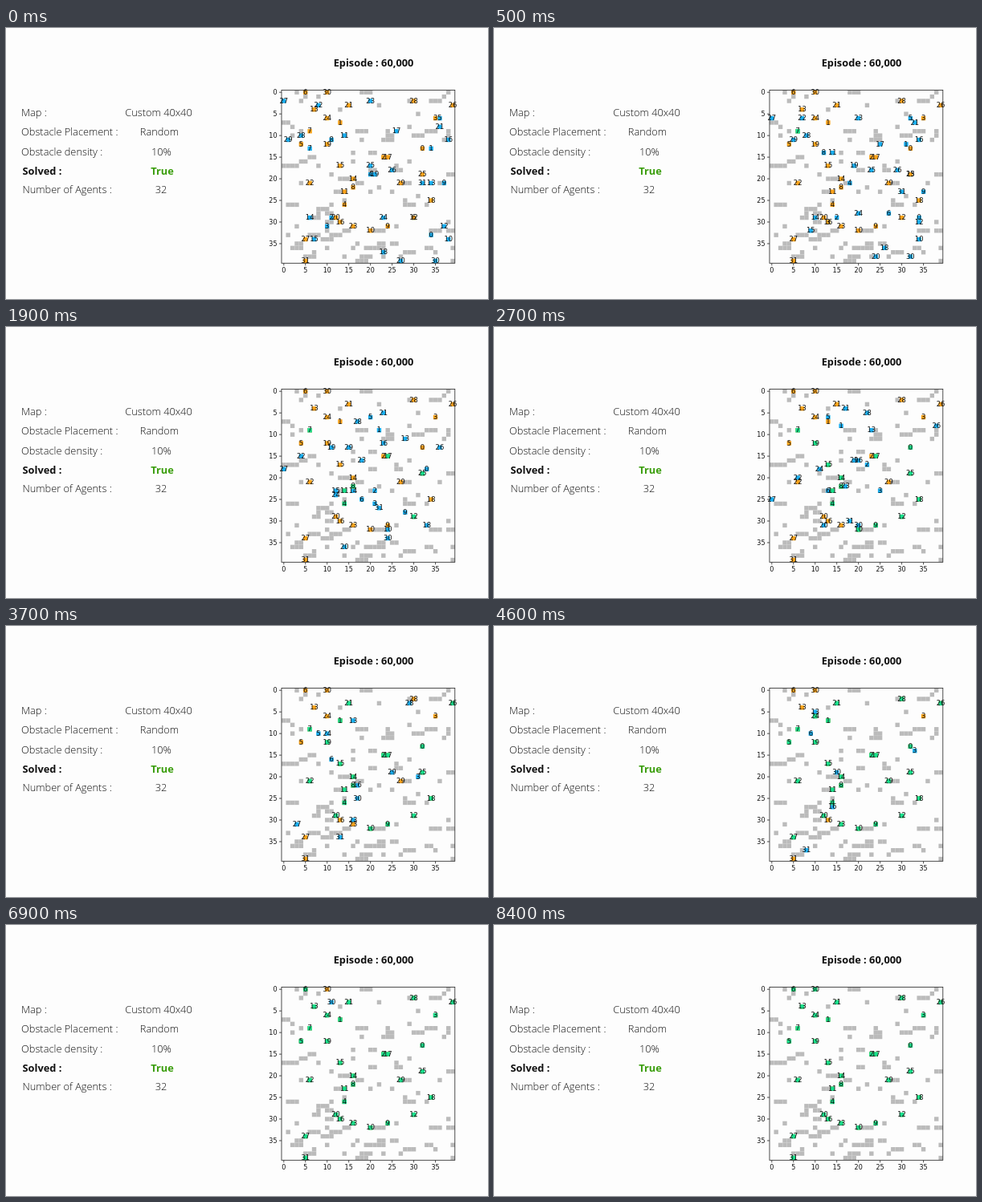
Recreate the animation shown at these times as an HTML page. Size 600 by 338 pixels, loop 8500 ms.

```html
<!DOCTYPE html>
<html lang="en">
<head>
<meta charset="utf-8">
<title>Multi-agent path finding</title>
<style>
html, body { margin: 0; width: 100%; height: 100%; overflow: hidden; background: #fdfdfd; }
svg { display: block; width: 100%; height: 100%; }
.info { font: 300 12.8px "Open Sans", sans-serif; fill: #111; }
.bold { font-weight: 700; }
.solved { fill: #3a9d0c; }
.mid { text-anchor: middle; }
.end { text-anchor: end; }
.tick, .label { font: 8px "DejaVu Sans", sans-serif; fill: #111; }
.label { font-size: 8.4px; text-anchor: middle; }
</style>
</head>
<body>
<svg viewBox="0 0 600 338">
  <g class="info">
    <text x="457.5" y="48" class="bold mid">Episode : 60,000</text>
    <text x="19" y="110">Map :</text>
    <text x="190" y="110" class="mid">Custom 40x40</text>
    <text x="19" y="134">Obstacle Placement :</text>
    <text x="191" y="134" class="mid">Random</text>
    <text x="19" y="158.5">Obstacle density :</text>
    <text x="193.5" y="158.5" class="mid">10%</text>
    <text x="20.5" y="182.5" class="bold">Solved :</text>
    <text x="194.5" y="182.5" class="bold solved mid">True</text>
    <text x="20.5" y="206.3">Number of Agents :</text>
    <text x="193" y="206.3" class="mid">32</text>
  </g>
  <g id="walls"></g>
  <g id="blue"></g>
  <g id="orange"></g>
  <g id="green"></g>
  <rect x="343" y="77.5" width="215.8" height="215.8" fill="none" stroke="#222" stroke-width=".8"/>
  <g id="axes"></g>
  <g id="labels"></g>
</svg>
<script>
const LOOP = 8500, STEP = 115, SIZE = 40, CELL = 5.393;
const COLORS = { walls: '#bbb', blue: '#18aef0', orange: '#fba31a', green: '#18e08c' };
const px = col => 345.8 + col * CELL;
const py = row => 80.2 + row * CELL;

function add(parent, tag, attrs, text) {
  const el = document.createElementNS('http://www.w3.org/2000/svg', tag);
  for (const key in attrs) el.setAttribute(key, attrs[key]);
  if (text !== undefined) el.textContent = text;
  return document.getElementById(parent).appendChild(el);
}
function place(el, [col, row], dx, dy) {
  el.setAttribute('x', px(col) + dx);
  el.setAttribute('y', py(row) + dy);
}
const placeCell = (el, at) => place(el, at, -CELL / 2, -CELL / 2);
const placeLabel = (el, at) => place(el, at, 0, 2.6);
function cell(layer, at) {
  const el = add(layer, 'rect', { width: CELL, height: CELL, fill: COLORS[layer] });
  placeCell(el, at);
  return el;
}
function label(text, at) {
  const el = add('labels', 'text', { class: 'label' }, text);
  placeLabel(el, at);
  return el;
}
const show = (el, visible) => el.setAttribute('visibility', visible ? 'visible' : 'hidden');

const agents = [];
const taken = new Set();

// Points are [column, row]: the start, an optional bend, the goal.
function agent(id, ...path) {
  const start = path[0], goal = path[path.length - 1];
  taken.add(String(start)).add(String(goal));
  cell('orange', goal);
  label(id, goal);
  agents.push({
    path, goal,
    body: cell('blue', start),
    done: cell('green', goal),
    tag: label(id, start)
  });
}
agent(0, [34, 33], [32, 13]);
agent(1, [34, 13], [13, 7]);
agent(2, [11, 29], [20, 29], [23, 15]);
agent(3, [10, 31], [30, 21], [35, 6]);
agent(4, [20, 19], [14, 26]);
agent(5, [36, 6], [14, 6], [4, 12]);
agent(6, [30, 29], [14, 24], [5, 0]);
agent(7, [6, 13], [6, 9]);
agent(8, [11, 11], [16, 22]);
agent(9, [37, 21], [24, 31]);
agent(10, [38, 34], [20, 32]);
agent(11, [14, 10], [14, 23]);
agent(12, [37, 31], [30, 29]);
agent(13, [34, 21], [28, 11], [7, 4]);
agent(14, [6, 29], [16, 29], [16, 20]);
agent(15, [7, 34], [12, 29], [13, 17]);
agent(16, [38, 11], [22, 12], [13, 30]);
agent(17, [26, 9], [24, 15]);
agent(18, [23, 37], [33, 32], [34, 25]);
agent(19, [21, 19], [10, 12]);
agent(20, [27, 39], [12, 36], [12, 29]);
agent(21, [36, 8], [15, 3]);
agent(22, [8, 3], [4, 17], [6, 21]);
agent(23, [20, 2], [16, 31]);
agent(24, [23, 29], [11, 23], [10, 6]);
agent(25, [20, 17], [32, 19]);
agent(26, [25, 18], [34, 18], [39, 3]);
agent(27, [0, 2], [0, 25], [5, 34]);
agent(28, [4, 10], [12, 9], [30, 2]);
agent(29, [1, 11], [16, 13], [27, 21]);
agent(30, [35, 39], [19, 31], [10, 0]);
agent(31, [32, 21], [5, 39]);

// Scatter short runs of obstacles over a tenth of the map.
let seed = 40;
function random(n) {
  seed = (seed * 1664525 + 1013904223) % 2 ** 32;
  return Math.floor(seed / 2 ** 32 * n);
}
for (let left = SIZE * SIZE / 10; left > 0;) {
  const col = random(SIZE), row = random(SIZE);
  const length = Math.max(1, random(5) - 1);
  for (let i = 0; i < length && left > 0; i++) {
    const at = [col + i, row];
    if (col + i >= SIZE || taken.has(String(at))) break;
    taken.add(String(at));
    cell('walls', at);
    left--;
  }
}

for (let i = 0; i < SIZE; i += 5) {
  add('axes', 'path', { stroke: '#222', 'stroke-width': .8, d: `M343 ${py(i)}h-3M${px(i)} 293.3v3` });
  add('axes', 'text', { class: 'tick end', x: 337.5, y: py(i) + 3 }, i);
  add('axes', 'text', { class: 'tick mid', x: px(i), y: 305.3 }, i);
}

// Walk one cell per step, as a staircase along each straight leg.
function position(path, steps) {
  for (let leg = 1; leg < path.length; leg++) {
    const [x, y] = path[leg - 1];
    const dx = path[leg][0] - x, dy = path[leg][1] - y;
    const distance = Math.abs(dx) + Math.abs(dy);
    if (steps < distance) {
      const alongX = Math.round(steps * Math.abs(dx) / distance);
      return [x + Math.sign(dx) * alongX, y + Math.sign(dy) * (steps - alongX)];
    }
    steps -= distance;
  }
  return path[path.length - 1];
}

function draw() {
  const steps = Math.floor(performance.now() % LOOP / STEP + .4);
  for (const { path, goal, body, done, tag } of agents) {
    const at = position(path, steps);
    const home = at === goal;
    placeCell(body, at);
    placeLabel(tag, at);
    show(done, home);
    show(tag, !home);
  }
  requestAnimationFrame(draw);
}
draw();
</script>
</body>
</html>
```
